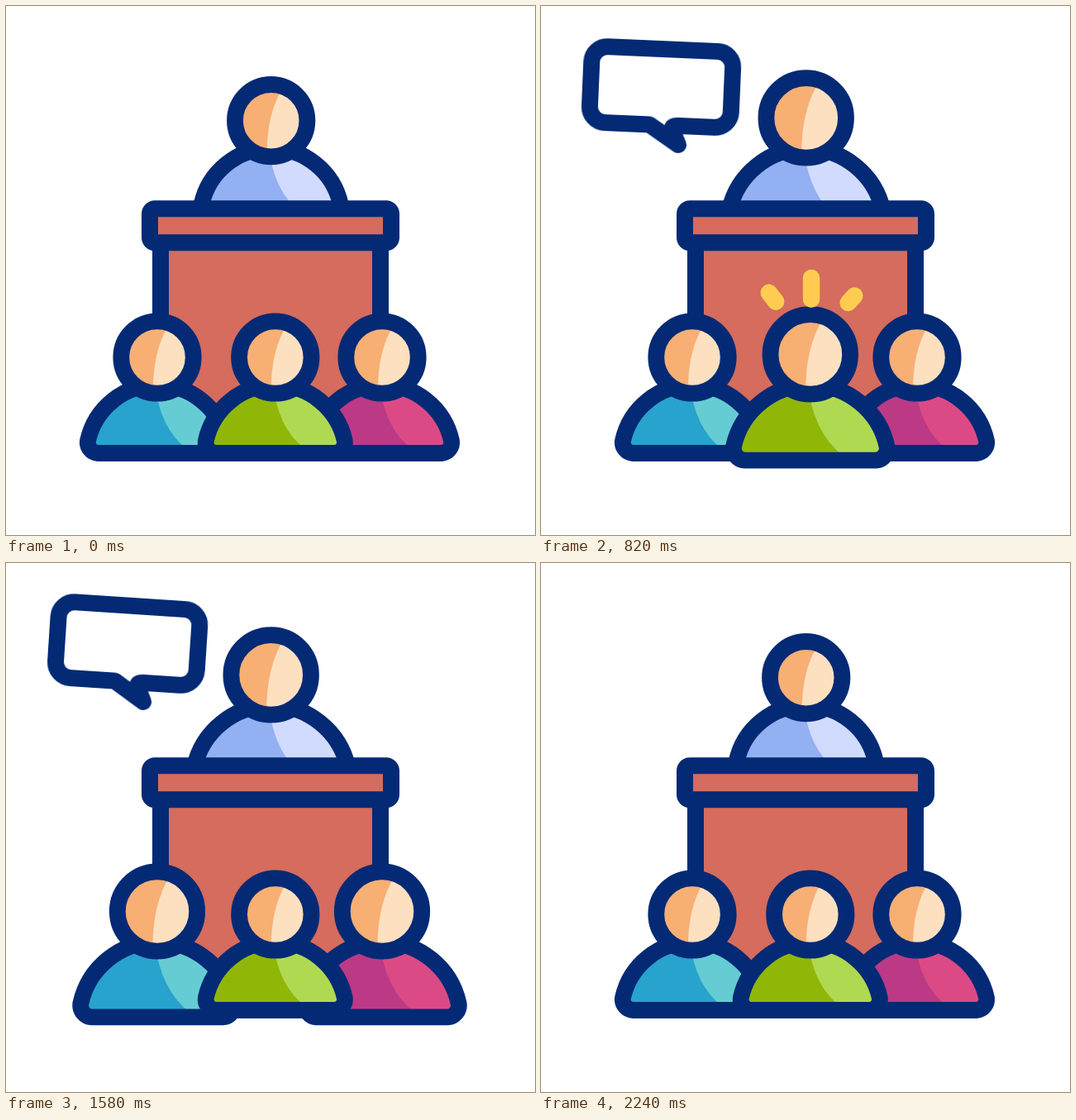
These frames come from a looping animation (640x640 px, 2.66 s). An HTML page:

```html
<!DOCTYPE html>
<html lang="en">
<head>
<meta charset="utf-8">
<title>Speech</title>
<style>
  @property --s { syntax: "<number>"; inherits: true; initial-value: 1; }
  @property --a { syntax: "<number>"; inherits: false; initial-value: 0; }
  @property --b { syntax: "<number>"; inherits: false; initial-value: 0; }

  html, body { margin: 0; width: 100%; height: 100%; overflow: hidden; background: #fff; }
  svg { display: block; width: 100%; height: 100%; }

  .line { stroke: #042a75; stroke-width: 20; stroke-linejoin: round; }
  .red { fill: #d56c5d; }

  /* People grow while their outline keeps its weight */
  .person {
    transform: scale(var(--s));
    animation: 2660ms ease-in-out infinite;
  }
  .outline { fill: none; stroke: #042a75; stroke-width: calc(19.8px / var(--s)); stroke-linejoin: round; }
  .dark { fill: var(--dark); }
  .light { fill: var(--light); }

  .speaker { --dark: #93b0f2; --light: #d1dbfe; transform-origin: 320.7px 170px; animation-name: speak; }
  .left { --dark: #28a3cd; --light: #66ccd3; transform-origin: 183px 459px; animation-name: sides; }
  .right { --dark: #bc3986; --light: #dc4a86; transform-origin: 455px 459px; animation-name: sides; }
  .middle { --dark: #90b708; --light: #b0d952; transform-origin: 325.8px 459px; animation-name: middle; }

  @keyframes speak {
    0%, 5.26%, 84.21%, 100% { --s: 1; }
    15.04%, 65.04% { --s: 1.105; }
  }
  @keyframes middle {
    0%, 18.8%, 51.88%, 100% { --s: 1; }
    28.95%, 35.34% { --s: 1.105; }
  }
  @keyframes sides {
    0%, 39.47%, 74.25%, 100% { --s: 1; }
    48.87%, 57.71% { --s: 1.105; }
  }

  .swing { transform-origin: 167px 169px; animation: swing 2660ms ease-in-out infinite; }
  .pop { transform-origin: 100px 90px; animation: pop 2660ms ease-in-out infinite; }

  @keyframes swing {
    0%, 18.8%, 69.17%, 100% { transform: rotate(-.9deg); }
    25.19% { transform: rotate(5deg); animation-timing-function: cubic-bezier(.4, 0, .4, 1); }
    44.36% { transform: rotate(-5.3deg); animation-timing-function: cubic-bezier(.6, 0, .6, 1); }
    63.53% { transform: rotate(5deg); }
  }
  @keyframes pop {
    0%, 7.52%, 82.7%, 100% { transform: scale(0); }
    16.54%, 72.93% { transform: scale(1.07); }
    22.56%, 69.92% { transform: scale(1); }
  }

  /* Each spark shows the stretch from a to b of its line */
  .sparks path {
    --mid: .42;
    fill: none;
    stroke: #ffcc51;
    stroke-width: 20.5;
    stroke-linecap: round;
    stroke-dasharray: calc(var(--b) - var(--a)) 9;
    stroke-dashoffset: calc(-1 * var(--a));
    animation: spark 2660ms ease-out infinite backwards;
  }
  .sparks .long { --mid: .69; }
  .late path { animation-delay: 520ms; }

  @keyframes spark {
    0%, 8.27% { --a: 0; --b: 0; visibility: hidden; }
    8.28% { visibility: visible; }
    11.28% { --a: .07; --b: var(--mid); }
    19.55% { --a: .9; --b: .98; }
    21.43% { --a: 1; --b: 1; visibility: visible; }
    21.44%, 100% { --a: 1; --b: 1; visibility: hidden; }
  }
</style>
</head>
<body>
<svg viewBox="0 0 640 640">
  <defs>
    <g id="person">
      <path class="dark" d="M-72 116H72A13 13 0 0 0 84 101A86 86 0 0 0-84 101A13 13 0 0 0-72 116Z"/>
      <path class="light" d="M-3 31Q3 86 36 111L72 116A13 13 0 0 0 84 101A86 86 0 0 0-3 31Z"/>
      <path class="outline" d="M-72 116H72A13 13 0 0 0 84 101A86 86 0 0 0-84 101A13 13 0 0 0-72 116Z"/>
      <circle r="43.7" fill="#f7af74"/>
      <path fill="#fde0bf" d="M15-41Q-6-8-5 43A43.7 43.7 0 0 0 15-41Z"/>
      <circle class="outline" r="43.7"/>
    </g>
  </defs>

  <g class="swing">
    <path class="pop line" fill="#fff" d="M130 145H76A19 19 0 0 1 57 126V72A19 19 0 0 1 76 53H209A19 19 0 0 1 228 72V126A19 19 0 0 1 209 145H164Q155 145 159 153L166 168Z"/>
  </g>

  <g class="person speaker"><use href="#person" x="320.7" y="138.7"/></g>

  <path class="red" d="M187 290H453V520H187Z"/>
  <path class="line" fill="none" d="M187 290V520M453 290V520"/>
  <rect class="line red" x="174" y="245.3" width="292" height="41" rx="6"/>

  <g class="person left"><use href="#person" x="183" y="425"/></g>
  <g class="person right"><use href="#person" x="455" y="425"/></g>
  <g class="person middle"><use href="#person" x="325.8" y="425"/></g>

  <g class="sparks">
    <path pathLength="1" d="M382 90L409 63"/>
    <path pathLength="1" class="long" d="M390 128L430 126"/>
    <path pathLength="1" d="M386 170L416 194"/>
  </g>
  <g class="sparks late">
    <path pathLength="1" d="M286 360L262 329"/>
    <path pathLength="1" class="long" d="M327 358V316"/>
    <path pathLength="1" d="M370 361L392 336"/>
  </g>
</svg>
</body>
</html>
```
